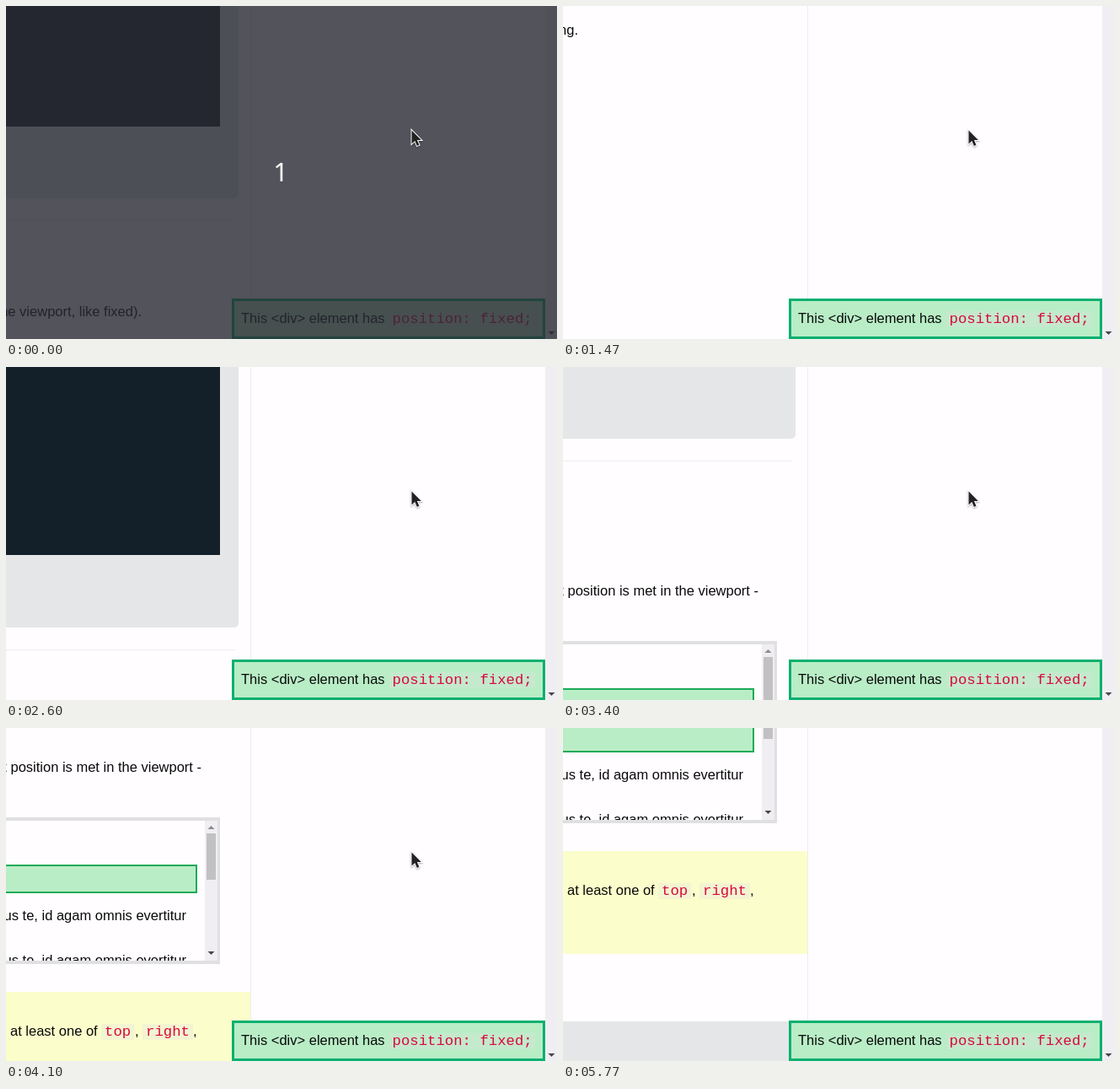
These frames come from a looping animation (654 px wide and 395 px high, 5.96 s). An HTML page with a canvas:

```html
<!DOCTYPE html>
<html lang="en">
<head>
<meta charset="utf-8">
<title>Scrolling past a fixed element</title>
<style>
  html, body { margin: 0; width: 100%; height: 100%; overflow: hidden; background: #fffdff; }
  canvas { display: block; }
</style>
</head>
<body>
<canvas id="stage" width="654" height="395"></canvas>
<script>
const ctx = document.getElementById('stage').getContext('2d');
const WIDTH = 654, HEIGHT = 395, LOOP = 5960;
const SANS = '16.5px "Liberation Sans", Arial, sans-serif';
const MONO = '17.325px "Liberation Mono", "Courier New", monospace';
const COLOR = {
  page: '#fffdff', rule: '#eeecef', panel: '#e4e6e7', dark: '#13202a', text: '#0a0a0a',
  note: '#fbfdcb', mint: '#b9edc6', green: '#0ab070', crimson: '#d8083c',
  track: '#f0eef2', thumb: '#c1c0c2', frame: '#e0dfe2'
};

// [time in ms, scroll offset in px]
const SCROLL = [
  [1040, 56], [1470, 378], [1630, 510], [2070, 669], [2230, 755], [2600, 1021],
  [2830, 1140], [3400, 1246], [3430, 1248], [3470, 1248], [4070, 1436],
  [4100, 1464], [4200, 1575], [4300, 1632]
];

function scrollAt(t) {
  if (t < SCROLL[0][0]) {
    const p = Math.min(1, Math.max(0, (t - 700) / 230));
    return Math.round(56 * p * p * (3 - 2 * p));
  }
  const next = SCROLL.findIndex(key => key[0] > t);
  if (next < 0) return SCROLL[SCROLL.length - 1][1];
  const [t0, y0] = SCROLL[next - 1], [t1, y1] = SCROLL[next];
  return Math.round(y0 + (y1 - y0) * (t - t0) / (t1 - t0));
}

function rect(x, y, w, h, color) {
  ctx.fillStyle = color;
  ctx.fillRect(x, y, w, h);
}

function text(str, x, y, align = 'left', color = COLOR.text, font = SANS) {
  ctx.font = font;
  ctx.textAlign = align;
  ctx.fillStyle = color;
  ctx.fillText(str, x, y);
}

function code(str, x, y) {
  ctx.font = MONO;
  rect(x - 4, y - 14, ctx.measureText(str).width + 8, 19, 'rgba(222,222,222,.3)');
  text(str, x, y, 'left', COLOR.crimson, MONO);
}

function arrow(x, y, dir, color) {
  ctx.fillStyle = color;
  ctx.beginPath();
  ctx.moveTo(x - 4, y - 2 * dir);
  ctx.lineTo(x + 4, y - 2 * dir);
  ctx.lineTo(x, y + 2 * dir);
  ctx.fill();
}

function outlined(x, y, w, h, line, stroke) {
  rect(x, y, w, h, stroke);
  rect(x + line, y + line, w - 2 * line, h - 2 * line, COLOR.mint);
}

// Grey example panel holding a dark code block
function example(top, darkTop, darkBottom, bottom) {
  ctx.fillStyle = COLOR.panel;
  ctx.beginPath();
  ctx.roundRect(-20, top, 296, bottom - top, 5);
  ctx.fill();
  rect(0, darkTop, 254, darkBottom - darkTop, COLOR.dark);
}

function stickyDemo() {
  rect(0, 107, 254, 174, COLOR.frame);
  rect(0, 111, 251, 166, COLOR.page);
  outlined(-20, 163, 247, 34, 2, '#1aab58');
  ctx.save();
  ctx.beginPath();
  ctx.rect(0, 111, 236, 166);
  ctx.clip();
  for (const y of [229, 282]) text('ius te, id agam omnis evertitur', 214, y, 'right');
  ctx.restore();
  rect(236, 111, 15, 166, COLOR.track);
  rect(238, 126, 11, 55, COLOR.thumb);
  arrow(243.5, 119, -1, '#8b8a8d');
  arrow(243.5, 268, 1, '#48474a');
}

function note() {
  rect(0, 314, 290, 122, COLOR.note);
  text('at least one of', 5, 366);
  code('top', 117, 366);
  text(',', 153, 366);
  code('right', 166, 366);
  text(',', 222, 366);
}

function page(scroll) {
  rect(0, 0, WIDTH, HEIGHT, COLOR.page);
  rect(290, 0, 1, HEIGHT, COLOR.rule);
  ctx.save();
  ctx.translate(0, -scroll);
  example(-300, -200, 143, 228);
  rect(0, 253, 272, 1, COLOR.rule);
  text('to the viewport, like fixed).', 161, 368, 'right');
  text('page scrolling.', 18, 413, 'right');
  example(779, 856, 1245, 1331);
  rect(0, 1357, 272, 1, COLOR.rule);
  text('offset position is met in the viewport -', 232, 1517, 'right');
  ctx.translate(0, 1464);
  stickyDemo();
  note();
  example(516, 593, 900, 980);
  ctx.restore();
}

function fixedParts() {
  rect(640, 0, 14, HEIGHT, COLOR.track);
  arrow(647.5, 388, 1, '#48474a');
  outlined(268, 347, 372, 48, 3, COLOR.green);
  text('This <div> element has', 279, 376);
  code('position: fixed;', 458.5, 376);
}

function countdown() {
  rect(0, 0, WIDTH, HEIGHT, 'rgba(40,42,51,.8)');
  text('1', 326, 208, 'center', '#fff', '31px "Noto Sans", "Open Sans", sans-serif');
}

function pointer(x, y) {
  const shape = new Path2D('M0 0V16L3.8 12.6L6.4 18.4L8.9 17.3L6.4 11.6H11.4Z');
  ctx.save();
  ctx.translate(x + .5, y + .5);
  ctx.shadowColor = 'rgba(0,0,0,.35)';
  ctx.shadowBlur = 2;
  ctx.shadowOffsetY = 1;
  ctx.lineWidth = 2;
  ctx.strokeStyle = '#fff';
  ctx.stroke(shape);
  ctx.shadowColor = 'transparent';
  ctx.fillStyle = '#222';
  ctx.fill(shape);
  ctx.restore();
}

function draw(t) {
  page(scrollAt(t));
  fixedParts();
  if (t < 30) countdown();
  if (t < 4530) pointer(481, 147);
  else if (t < 4630) pointer(328, 84);
  else if (t < 4730) pointer(175, 21);
}

const start = performance.now();
function frame() {
  draw((performance.now() - start) % LOOP);
  requestAnimationFrame(frame);
}
frame();
</script>
</body>
</html>
```
